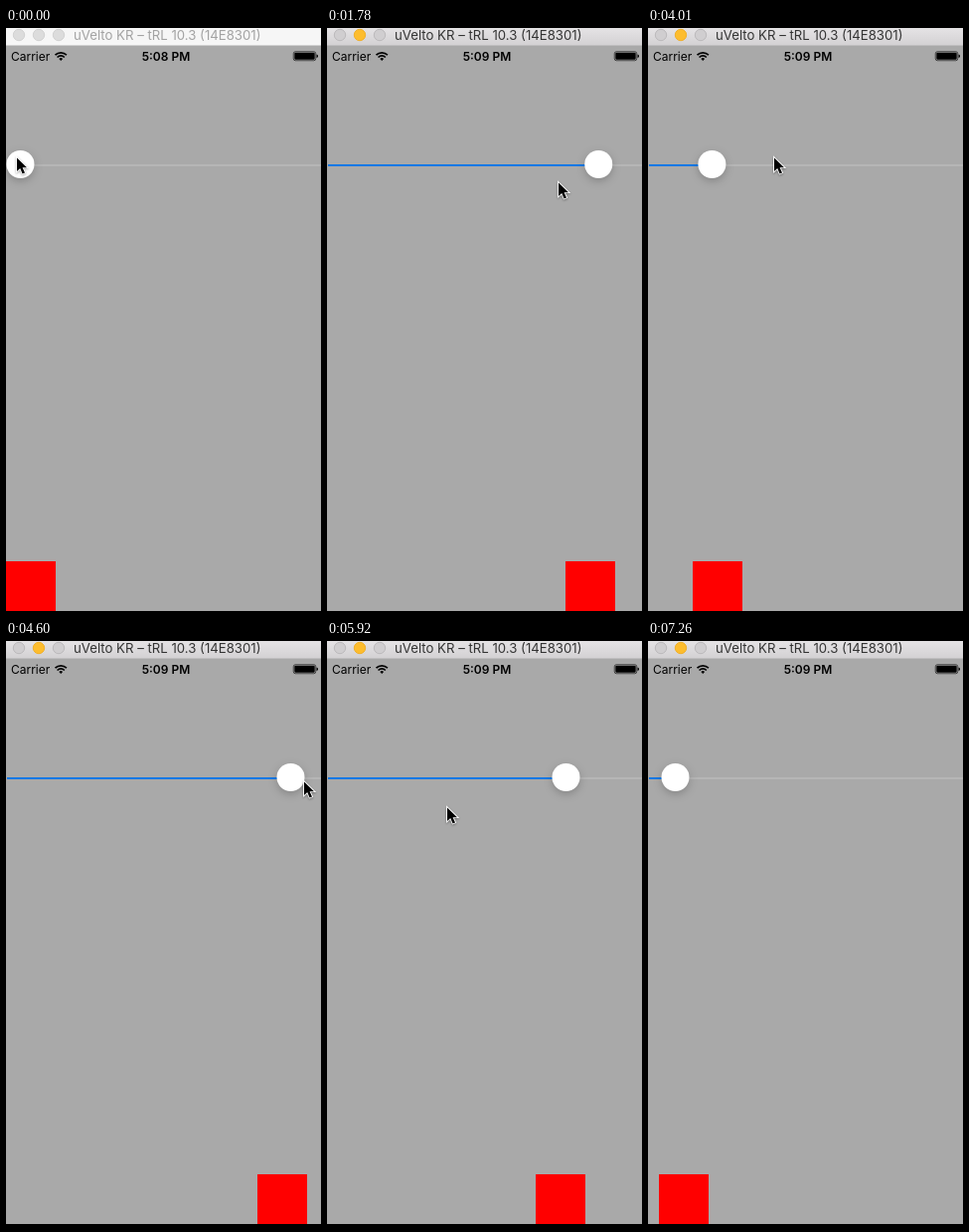
An HTML page for the animation above (7560 ms loop, 317 px wide and 588 px high).

```html
<!DOCTYPE html>
<html lang="en">
<head>
<meta charset="utf-8">
<title>Slider moving a square</title>
<style>
  html, body { margin: 0; width: 100%; height: 100%; overflow: hidden; background: #a9a9a9; }
  svg { display: block; font-family: Inter, sans-serif; }
  #knob { filter: drop-shadow(0 3px 4px rgba(0, 0, 0, .2)); }
  #pointer { filter: drop-shadow(0 1px 1px rgba(0, 0, 0, .35)); }
  .bar { fill: #f6f6f6; }
  .dot { fill: #dcdcdc; stroke: #d2d2d2; }
  .title { fill: #a3a3a3; }
  .active .bar { fill: url(#chrome); }
  .active .dot { fill: #d0ced0; stroke: #bcbabc; }
  .active .minimise { fill: #fdbd2e; stroke: #f0b02a; }
  .active .title { fill: #343434; }
</style>
</head>
<body>
<svg width="317" height="588" viewBox="0 0 317 588">
  <defs>
    <linearGradient id="chrome" x2="0" y2="1">
      <stop stop-color="#e5e3e5"/>
      <stop offset="1" stop-color="#d3d1d3"/>
    </linearGradient>
  </defs>
  <rect width="317" height="588" fill="#a9a9a9"/>

  <g id="window">
    <rect class="bar" width="317" height="17.5"/>
    <circle class="dot" cx="13" cy="7" r="5.7"/>
    <circle class="dot minimise" cx="33" cy="7" r="5.7"/>
    <circle class="dot" cx="53" cy="7" r="5.7"/>
    <text class="title" x="68" y="12" font-size="13.2">uVelto KR – tRL 10.3 (14E8301)</text>
  </g>

  <text x="5" y="32.5" font-size="12">Carrier</text>
  <g fill="none" stroke="#000" stroke-width="1.7">
    <path d="M49.5 27.2a8 8 0 0 1 11.4 0M51.6 29.5a5 5 0 0 1 7.2 0"/>
    <path d="M55.2 33l-1.9-2a2.7 2.7 0 0 1 3.8 0z" fill="#000" stroke="none"/>
  </g>
  <text id="clock" x="161" y="32.5" font-size="12" font-weight="600" text-anchor="middle"></text>
  <rect x="289.25" y="23.75" width="22.5" height="9" rx="2" fill="none" stroke="#000" stroke-width=".6"/>
  <rect x="290.3" y="24.8" width="20.4" height="6.9" rx="1"/>
  <path d="M312.5 26.5q1.5 .3 1.5 1.8t-1.5 1.8z"/>

  <rect x="1" y="137" width="316" height="2" fill="#b6b6b6"/>
  <rect id="fill" x="1" y="137" height="2" fill="#1179e5"/>
  <circle id="knob" cy="137" r="14" fill="#fff"/>
  <rect id="square" y="536" width="50" height="50" fill="#f00"/>
  <rect y="586" width="317" height="2"/>
  <path id="pointer" d="M1 1.5V15l3.2-3 2.4 5.4 2.4-1-2.4-5.2h4.4z"
    stroke="#fff" stroke-width="1.8" paint-order="stroke"/>
</svg>
<script>
  const LOOP = 7560, TICK = 148.2;
  const LAG = .5, GRAB = 4;   // the knob trails the pointer by half a tick
  const RELEASE = 16, REGRAB = 26, DROP = 44;

  const $ = id => document.getElementById(id);
  const set = (id, name, value) => $(id).setAttribute(name, value);
  const clamp = (value, low, high) => Math.min(high, Math.max(low, value));

  // Turning points of the pointer: tick, x, y
  const path = [
    [0, 10, 129], [4, 10, 129], [6, 169, 130], [8, 301, 132], [11, 306, 150],
    [15, 8, 164], [16, -6, 163], [19, 186, 138], [21, 186, 138], [25, 7, 131],
    [26.1, 7, 131], [27, 126, 129], [30, 265, 136], [31, 299, 140], [35, 0, 160],
    [36, 0, 131], [39.5, 236, 150], [40, 120, 166], [43.5, 23, 126], [45, 23, 126],
    [49, 310, 600]
  ];

  function pointerAt(tick) {
    const i = path.findIndex(point => point[0] > tick);
    if (i < 0) return path.at(-1).slice(1);
    const [from, ...a] = path[i - 1], [to, ...b] = path[i];
    return a.map((value, k) => value + (b[k] - value) * (tick - from) / (to - from));
  }

  function knobAt(tick) {
    const dragEnd = tick < REGRAB ? RELEASE : DROP;
    const [x] = pointerAt(clamp(tick - LAG, 0, dragEnd - LAG));
    return clamp(x + GRAB, 14, 302);
  }

  function draw(now) {
    const tick = Math.floor((now % LOOP + 10) / TICK);
    const [x, y] = pointerAt(tick).map(Math.round);
    const knob = knobAt(tick);
    $('window').classList.toggle('active', tick >= 4);
    $('clock').textContent = tick < 2 ? '5:08 PM' : '5:09 PM';
    set('knob', 'cx', knob + .5);
    set('fill', 'width', knob);
    set('square', 'x', Math.max(0, Math.floor((knob - 14.9) * .934)));
    set('pointer', 'transform', `translate(${x} ${y})`);
  }

  const start = performance.now();
  (function frame() {
    draw(performance.now() - start);
    requestAnimationFrame(frame);
  })();
</script>
</body>
</html>
```
